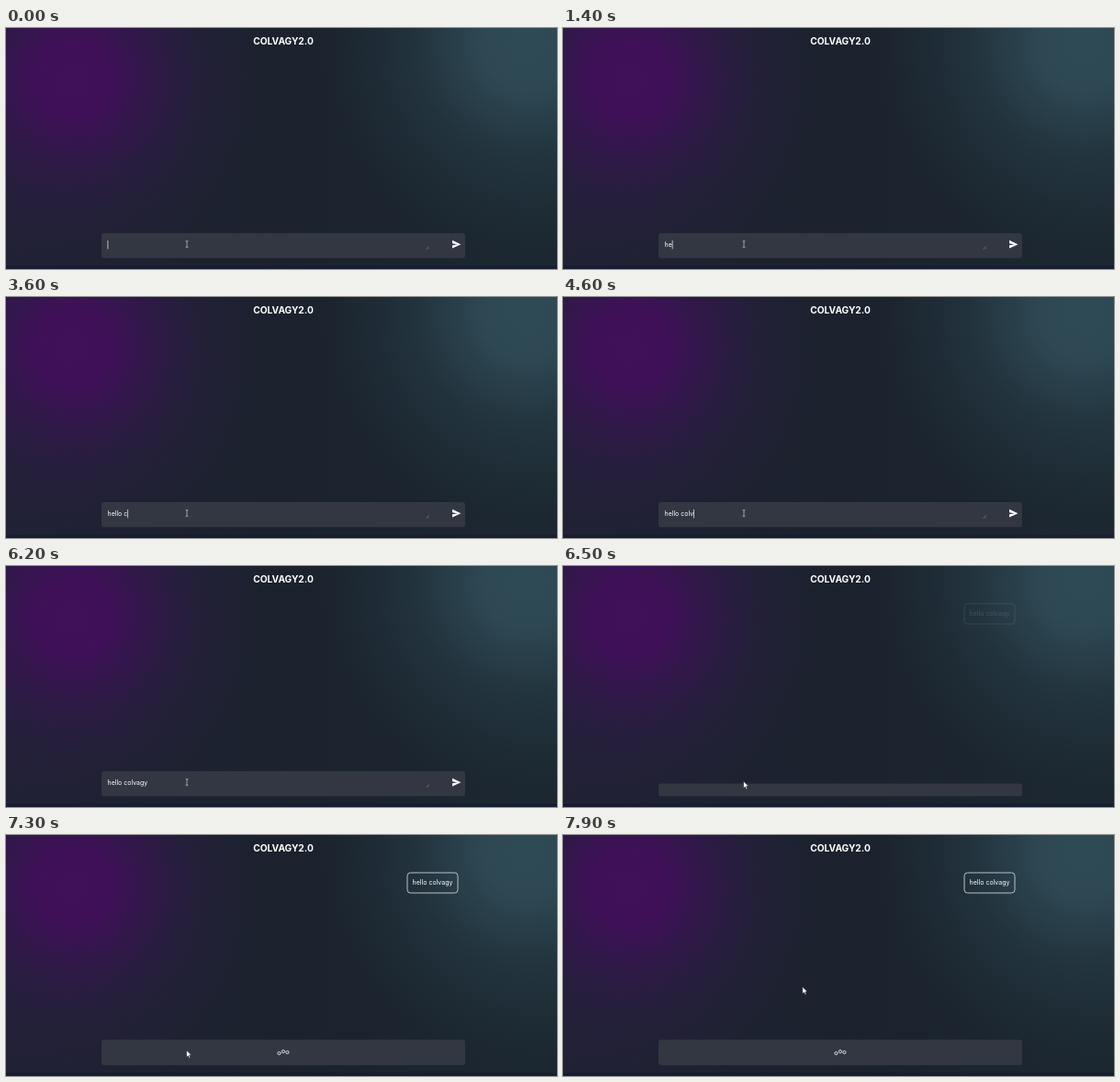
Write an HTML page that moves like this. It is 600 px wide and 262 px high and loops after 8 s.

```html
<!DOCTYPE html>
<html lang="en">
<head>
<meta charset="utf-8">
<style>
  html, body { margin: 0; width: 100%; height: 100%; overflow: hidden; background: #1b222d; }
  svg { display: block; width: 100vw; height: 100vh; }
  text { font-family: Inter, sans-serif; fill: #fff; white-space: pre; }
  .msg { font-size: 7px; }
</style>
</head>
<body>
<svg viewBox="0 0 600 262" preserveAspectRatio="none">
  <defs>
    <radialGradient id="violet" gradientUnits="userSpaceOnUse" cx="73" cy="55" r="205">
      <stop offset="0" stop-color="#401059"/>
      <stop offset=".2" stop-color="#401059" stop-opacity=".97"/>
      <stop offset=".42" stop-color="#3a1355" stop-opacity=".62"/>
      <stop offset=".68" stop-color="#301a4c" stop-opacity=".3"/>
      <stop offset="1" stop-color="#28204a" stop-opacity="0"/>
    </radialGradient>
    <radialGradient id="teal" gradientUnits="userSpaceOnUse" cx="568" cy="18" r="225">
      <stop offset="0" stop-color="#2f4b56"/>
      <stop offset=".22" stop-color="#2f4b56" stop-opacity=".92"/>
      <stop offset=".55" stop-color="#2c4752" stop-opacity=".4"/>
      <stop offset="1" stop-color="#26404a" stop-opacity="0"/>
    </radialGradient>
    <linearGradient id="tint">
      <stop offset="0" stop-color="#212135"/>
      <stop offset=".5" stop-color="#1b222d"/>
      <stop offset="1" stop-color="#1c2831"/>
    </linearGradient>
  </defs>

  <rect width="600" height="262" fill="url(#tint)"/>
  <rect width="600" height="262" fill="url(#violet)"/>
  <rect width="600" height="262" fill="url(#teal)"/>
  <rect y="258.5" width="600" height="3.5" fill="#151b30" opacity=".75"/>

  <text x="302" y="18.2" text-anchor="middle" font-size="10.2" font-weight="700">COLVAGY2.0</text>

  <g id="bubble">
    <rect x="437" y="41" width="55" height="22" rx="3.5" fill="none" stroke="#b9c1c6"/>
    <text class="msg" x="464.5" y="54.3" text-anchor="middle">hello colvagy</text>
  </g>

  <rect id="field" x="104" width="396" rx="3" fill="#323741"/>

  <g id="form">
    <text id="typed" class="msg" x="110.5" y="238.2"></text>
    <rect id="caret" y="231" width=".8" height="9.3" fill="#dfe2e6"/>
    <path d="M486 230.8L495.4 235.2L486 239.6V236.2L491.5 235.2L486 234.2Z" fill="#fff"/>
    <path d="M457.6 240.4L460.6 237.4M459.4 240.4L460.6 239.2" stroke="#858a93" stroke-width=".6"/>
    <path d="M195.6 231.4Q197 231.4 197 232.4Q197 231.4 198.4 231.4M197 232V238M195.6 238.6Q197 238.6 197 237.6Q197 238.6 198.4 238.6"
      fill="none" stroke="#b4b8be" stroke-width=".8"/>
  </g>

  <g id="dots" fill="none" stroke="#eef0f2" stroke-width=".9">
    <circle cx="297.4" r="1.6"/><circle cx="301.9" r="1.6"/><circle cx="306.4" r="1.6"/>
  </g>

  <path id="arrow" d="M0 0V7.6L1.8 6L3 8.8L4.2 8.3L3 5.6H5.4Z" fill="#fff" stroke="#10141c" stroke-width=".5"/>
  <text id="ruler" class="msg" visibility="hidden">hello colvagy</text>
</svg>

<script>
const $ = id => document.getElementById(id);
const LOOP = 8000, STEP = 100;
const MESSAGE = 'hello colvagy';
const KEYS = [1100, 1300, 1700, 1900, 2300, 2800, 3400, 3800, 4000, 4300, 5200, 5400, 5700];
const SENT = 6300, FADE = 6400, LOADING = 7300;
const dots = [...$('dots').children];

const clamp = v => Math.max(0, Math.min(1, v));
const ease = v => v * v * (3 - 2 * v);
const show = (el, on) => el.setAttribute('visibility', on ? 'visible' : 'hidden');

function drawForm(t) {
  const count = KEYS.filter(k => k <= t).length;
  const lastKey = count ? KEYS[count - 1] : 0;
  const width = count ? $('ruler').getSubStringLength(0, count) : 0;
  $('typed').textContent = MESSAGE.slice(0, count);
  $('caret').setAttribute('x', 110.5 + width);
  // The blink restarts with every key press
  $('caret').setAttribute('opacity', (t - lastKey) % 1000 < 500 ? 1 : 0);
}

function drawField(t) {
  const top = t < SENT ? 223 : t < LOADING ? 236.5 : 222.5;
  $('field').setAttribute('y', top);
  $('field').setAttribute('height', 250.3 - top);
}

function drawDots(t) {
  const turn = (t - 7900) / 600 * 2 * Math.PI - 0.5;
  dots.forEach((dot, i) =>
    dot.setAttribute('cy', 236.3 + 1.1 * Math.cos(turn - i * 2 * Math.PI / 3)));
}

function drawArrow(t) {
  const p = ease(clamp((t - LOADING) / 600));
  $('arrow').setAttribute('transform', `translate(${196.6 + 64.2 * p} ${234 - 69 * p})`);
}

function render(t) {
  drawForm(t);
  drawField(t);
  drawDots(t);
  drawArrow(t);
  $('bubble').setAttribute('opacity', clamp((t - FADE) / 700));
  $('form').setAttribute('display', t < SENT ? 'inline' : 'none');
  show($('arrow'), t >= SENT);
  show($('dots'), t >= LOADING);
}

const start = performance.now();
function tick() {
  const t = (performance.now() - start) % LOOP;
  render(Math.floor(t / STEP) * STEP);
  requestAnimationFrame(tick);
}
tick();
</script>
</body>
</html>
```
